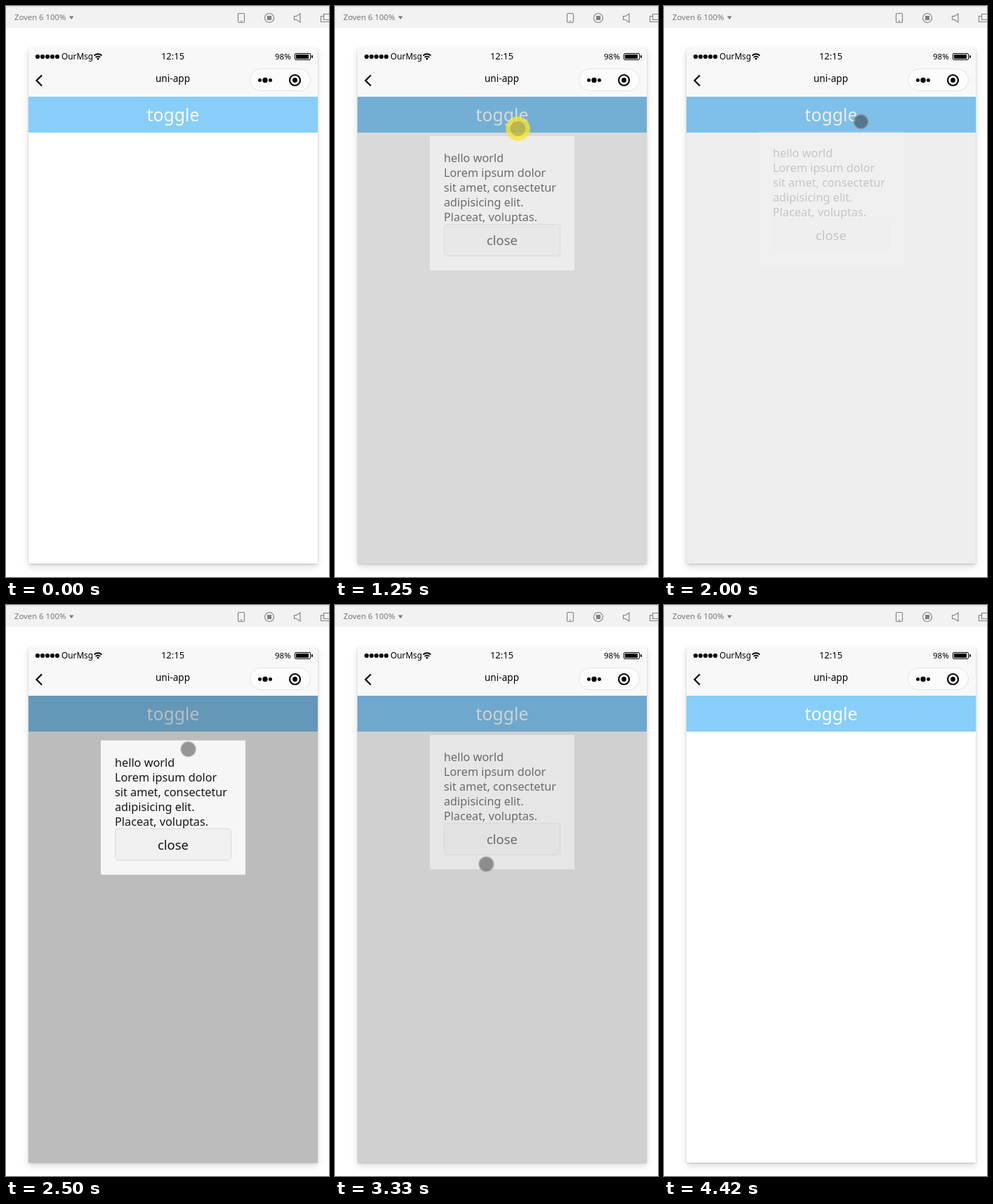
Recreate the animation shown at these times as an HTML page. Size 460 by 812 pixels, loop 4510 ms.

```html
<!DOCTYPE html>
<html lang="en">
<head>
<meta charset="utf-8">
<style>
  html, body { margin: 0; width: 100%; height: 100%; overflow: hidden; background: #fff; }
  svg { display: block; width: 460px; height: 812px; font-family: "Noto Sans", "Open Sans", sans-serif; }
  .phone { fill: #fff; filter: drop-shadow(0 1px 1px rgba(0, 0, 0, .16)) drop-shadow(0 4px 5px rgba(0, 0, 0, .14)); }
  .icons { fill: none; stroke: #808080; stroke-width: 1.1; }
  .line { fill: none; stroke: #000; }
  .mid { text-anchor: middle; }
  .copy { font-size: 16.25px; }
</style>
</head>
<body>
<svg viewBox="0 0 460 812">
  <!-- simulator toolbar -->
  <rect width="460" height="31" fill="#f2f2f2"/>
  <rect width="460" height="2" fill="#e6e6e6"/>
  <text x="12" y="20" font-size="11.3" fill="#777">Zoven 6 100%</text>
  <path d="M90 14.5h6.5l-3.25 4.5z" fill="#777"/>
  <g class="icons">
    <rect x="330.5" y="10.5" width="9" height="13" rx="1.5"/>
    <path d="M333.5 21.5h3"/>
    <circle cx="375" cy="17" r="6.5"/>
    <rect x="372.5" y="14.5" width="5" height="5" fill="#808080"/>
    <path d="M410.5 14.5h3l5.5-3.5v12l-5.5-3.5h-3z"/>
    <path d="M452.5 11.5h10v8h-10zM452 14.5h-3.5v8h12"/>
  </g>

  <!-- phone -->
  <rect class="phone" x="32" y="60" width="412" height="733"/>
  <rect x="32" y="60" width="412" height="69" fill="#f8f8f8"/>
  <path class="line" d="M45 72H73.1" stroke-width="6.2" stroke-linecap="round" stroke-dasharray="0 7"/>
  <text x="79" y="76" font-size="11.8">OurMsg</text>
  <path class="line" d="M125.5 70.5q5.5-4.5 11 0M127.6 73q3.4-2.8 6.8 0" stroke-width="1.7"/>
  <circle cx="131" cy="75" r="1.5"/>
  <text class="mid" x="237.5" y="76" font-size="13">12:15</text>
  <text x="383" y="76" font-size="11.5">98%</text>
  <rect class="line" x="411.5" y="67.5" width="22" height="9" rx="1.5"/>
  <rect x="413" y="69" width="18" height="6"/>
  <rect x="435" y="70" width="1.8" height="4" rx=".8"/>
  <path class="line" d="M51 98.5l-7.5 7.5 7.5 7.5" stroke-width="2.2"/>
  <text class="mid" x="237.5" y="108" font-size="13.6">uni-app</text>
  <rect x="347.5" y="89.5" width="86" height="31" rx="15.5" fill="#fcfcfc" stroke="#e4e4e4"/>
  <circle cx="361.5" cy="105.5" r="2.5"/>
  <circle cx="369" cy="105.5" r="3.7"/>
  <circle cx="376.5" cy="105.5" r="2.5"/>
  <circle class="line" cx="411.5" cy="105.5" r="7.5" stroke-width="2.2"/>
  <circle cx="411.5" cy="105.5" r="3.4"/>

  <!-- page -->
  <rect x="32" y="129" width="412" height="51" fill="#87cefa"/>
  <text class="mid" x="238" y="164" font-size="24.8" fill="#fff">toggle</text>
  <rect id="mask" x="32" y="129" width="412" height="664"/>
  <g id="popup">
    <rect x="135" y="195" width="206" height="191" fill="#fff"/>
    <g class="copy">
      <text x="155" y="232">hello world</text>
      <text x="155" y="253">Lorem ipsum dolor</text>
      <text x="155" y="274">sit amet, consectetur</text>
      <text x="155" y="295">adipisicing elit.</text>
      <text x="155" y="316">Placeat, voluptas.</text>
    </g>
    <rect x="155.5" y="320.5" width="165" height="45" rx="4.5" fill="#f8f8f8" stroke="#dedede"/>
    <text class="mid" x="238" y="350" font-size="18.4">close</text>
  </g>

  <g id="cursor">
    <circle id="ripple" fill="#f9e634"/>
    <circle id="dot" r="10.3" stroke-width="2"/>
  </g>
</svg>
<script>
  const LOOP = 4510, TICK = 1000 / 12;
  const FADE = 280, MASK_LAG = 18;
  const CLICKS = [1168, 1850, 2335, 3249]; // open, close, open, close
  // cursor stops: [ms, x, y]
  const STOPS = [
    [83, 393, 721], [583, 281, 201], [917, 260.5, 174.5], [1833, 260.5, 174.5],
    [2000, 280.5, 164.5], [2333, 270, 142], [2750, 240.5, 320.5],
    [3167, 222, 350], [3333, 215.5, 368.5], [3750, 75, 731]
  ];

  const $ = id => document.getElementById(id);
  const set = (id, attrs) => {
    for (const key in attrs) $(id).setAttribute(key, attrs[key]);
  };
  const clamp = u => Math.max(0, Math.min(1, u));
  const smooth = u => u * u * (3 - 2 * u);
  const bezier = (a, b, s) => 3 * a * s * (1 - s) ** 2 + 3 * b * s * s * (1 - s) + s ** 3;

  // CSS "ease", solved by bisection
  function ease(u) {
    let lo = 0, hi = 1;
    for (let i = 0; i < 20; i++) {
      const s = (lo + hi) / 2;
      if (bezier(.25, .25, s) < u) lo = s; else hi = s;
    }
    return bezier(.1, 1, hi);
  }

  // Each click swaps direction; lag delays the closing fades.
  const fade = (t, lag) => CLICKS.reduce((sum, click, i) => {
    const closing = i % 2;
    const p = ease(clamp((t - click - closing * lag) / FADE));
    return sum + (closing ? -p : p);
  }, 0);

  function cursorAt(t) {
    const next = STOPS.findIndex(stop => stop[0] > t);
    const [b, a] = next < 1 ? [STOPS[1], STOPS[0]] : [STOPS[next], STOPS[next - 1]];
    const u = smooth(clamp((t - a[0]) / (b[0] - a[0])));
    return [1, 2].map(i => a[i] + (b[i] - a[i]) * u);
  }

  function draw(now) {
    const tick = Math.min(53, Math.floor((now % LOOP + 5) / TICK));
    const t = tick * TICK;
    const show = fade(t, 0);
    const [x, y] = cursorAt(t);
    const clickedAt = n => CLICKS.some(click => Math.floor(click / TICK) === n);
    const pressed = clickedAt(tick), released = clickedAt(tick - 1);

    set('mask', { opacity: .3 * fade(t, MASK_LAG) });
    set('popup', { opacity: show, transform: `translate(0 ${-20 * (1 - show)})` });
    set('cursor', { transform: `translate(${x} ${y})`, opacity: t > 80 && t < 3750 ? 1 : 0 });
    set('ripple', { r: pressed ? 23.5 : released ? 17.3 : 0, opacity: pressed ? 1 : .78 });
    set('dot', {
      opacity: pressed ? 0 : 1,
      fill: released ? 'rgba(60,60,60,.22)' : 'rgba(30,35,40,.46)',
      stroke: released ? 'rgba(150,140,60,.15)' : 'rgba(160,160,160,.6)'
    });
  }

  const start = performance.now();
  function loop() {
    draw(performance.now() - start);
    requestAnimationFrame(loop);
  }
  loop();
</script>
</body>
</html>
```
